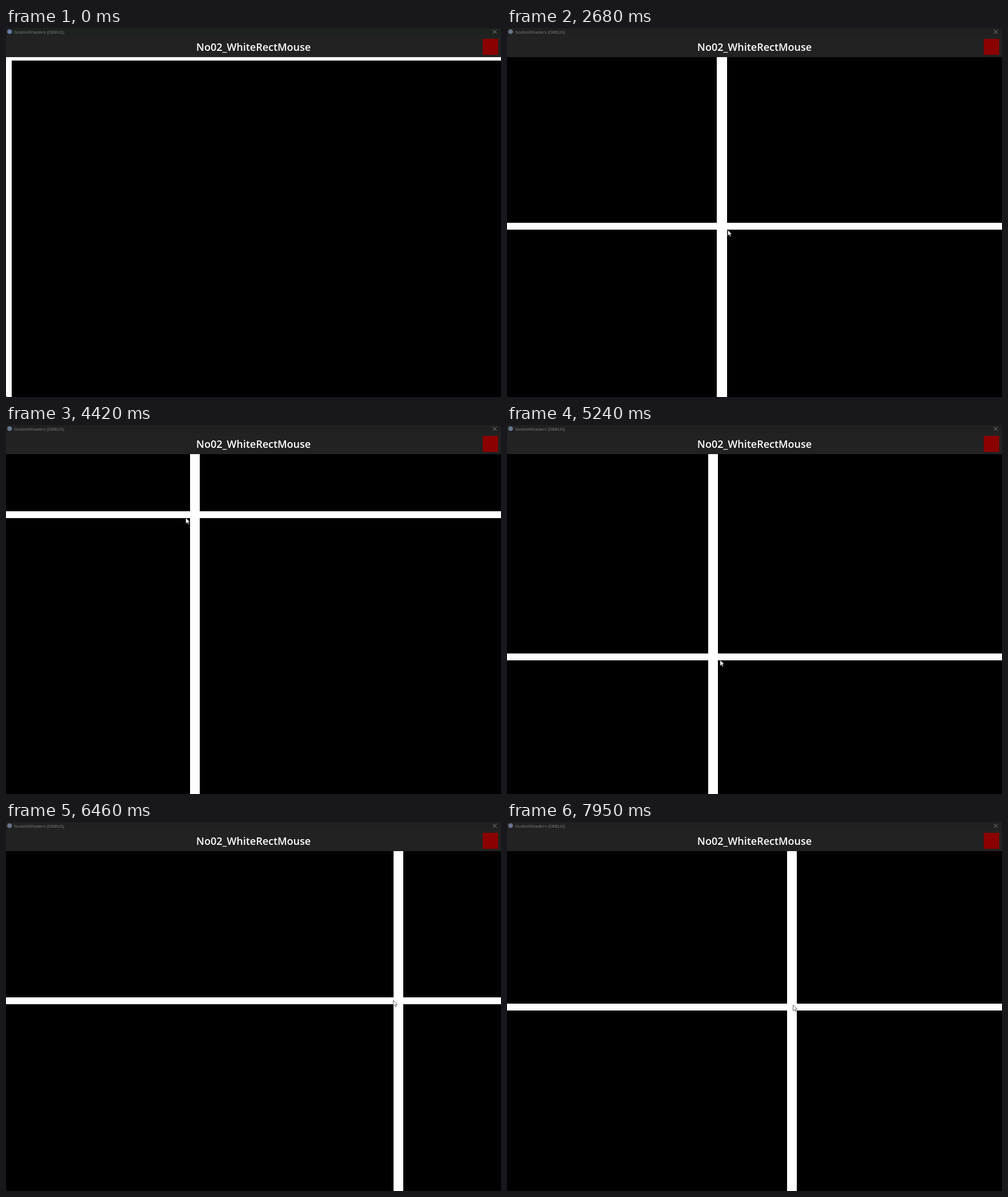
An HTML page that plays this animation: 866 px wide and 646 px high, repeating every 8 s.

```html
<!DOCTYPE html>
<html lang="en">
<head>
<meta charset="utf-8">
<title>No02_WhiteRectMouse</title>
<style>
  html, body { margin: 0; width: 100%; height: 100%; overflow: hidden; background: #000; }
  svg { display: block; }
  text { font-family: "Open Sans", sans-serif; }
</style>
</head>
<body>
<svg width="866" height="646" viewBox="0 0 866 646">
  <rect width="866" height="646"/>
  <g fill="#fff" shape-rendering="crispEdges">
    <rect id="column" y="51" width="17.3" height="595"/>
    <rect id="row" width="866" height="11.9"/>
  </g>
  <path d="M0 644v2h2q-1.6-.4-2-2z" fill="#222"/>

  <rect width="866" height="51" fill="#222"/>
  <rect width="866" height="13" fill="#202020"/>
  <rect id="tint" width="866" height="13" fill="#1c231f"/>
  <circle id="icon" cx="6.3" cy="6.4" r="4.2" fill="#66758c"/>
  <text x="14" y="9.6" font-size="7.65" fill="#808080">Godot4Shaders (DEBUG)</text>
  <path d="M851.5 3.2l7 7m0-7l-7 7" stroke="#a0a0a0" stroke-width=".8"/>
  <text x="433" y="39.7" font-size="18" font-weight="600" fill="#fff" text-anchor="middle">No02_WhiteRectMouse</text>
  <rect x="834" y="19" width="27" height="28" fill="#8b0000"/>

  <path id="cursor" d="M.4.4V10.6L2.8 8.4 4.4 12 6 11.3 4.5 7.8H7.6z"
        fill="#fff" stroke="#333" stroke-width=".75" stroke-linejoin="round"/>
</svg>
<script>
const LOOP = 8000, ENTER = 1980, MOVE = 3080;
const LAG = 0.4; // ticks the bars trail behind the pointer

// tick, bar centre x, y, pointer lead x, y
const KEYS = [
  [-22, 1.7, 51, 0, 5],
  [-4, 430, 380, 0, 0],
  [-1, 430, 380, 0, 0],
  [9, 645.7, 418, 7.5, -4],
  [26, 330.7, 156.6, -16.5, 5.5],
  [57, 759, 401, 4, -7],
  [75, 442.3, 347.8, -7, 4.5],
  [95, 498.6, 324, 1.5, -4]
];

const $ = id => document.getElementById(id);
const column = $("column"), row = $("row"), cursor = $("cursor"), tint = $("tint"), icon = $("icon");

// Cubic Hermite on one axis: [position, speed per tick]
function hermite(a, b, axis, n) {
  const span = b[0] - a[0], s = (n - a[0]) / span;
  const p = a[axis], q = b[axis];
  const u = a[axis + 2] / LAG * span, v = b[axis + 2] / LAG * span;
  const c3 = 2 * p - 2 * q + u + v, c2 = 3 * q - 3 * p - 2 * u - v;
  return [((c3 * s + c2) * s + u) * s + p, ((3 * c3 * s + 2 * c2) * s + u) / span];
}

function draw(t) {
  const raw = Math.floor((t - MOVE) / (t < MOVE ? 50 : 51.25));
  const n = Math.min(95, Math.max(-22, raw));
  let i = 0;
  while (i < KEYS.length - 2 && n >= KEYS[i + 1][0]) i++;
  const [x, vx] = hermite(KEYS[i], KEYS[i + 1], 1, n);
  const [y, vy] = hermite(KEYS[i], KEYS[i + 1], 2, n);

  column.setAttribute("x", x - 8.65);
  row.setAttribute("y", y - 5.95);
  cursor.setAttribute("transform", `translate(${x + vx * LAG} ${y + vy * LAG})`);
  cursor.style.visibility = t < ENTER ? "hidden" : "visible";
  tint.style.opacity = t < 50 ? 1 : t < 100 ? 0.6 : t < 140 ? 0.3 : 0;
  icon.setAttribute("fill", t < 140 ? "#6579a6" : "#66758c");
}

function tick() {
  draw(performance.now() % LOOP);
  requestAnimationFrame(tick);
}
tick();
</script>
</body>
</html>
```
